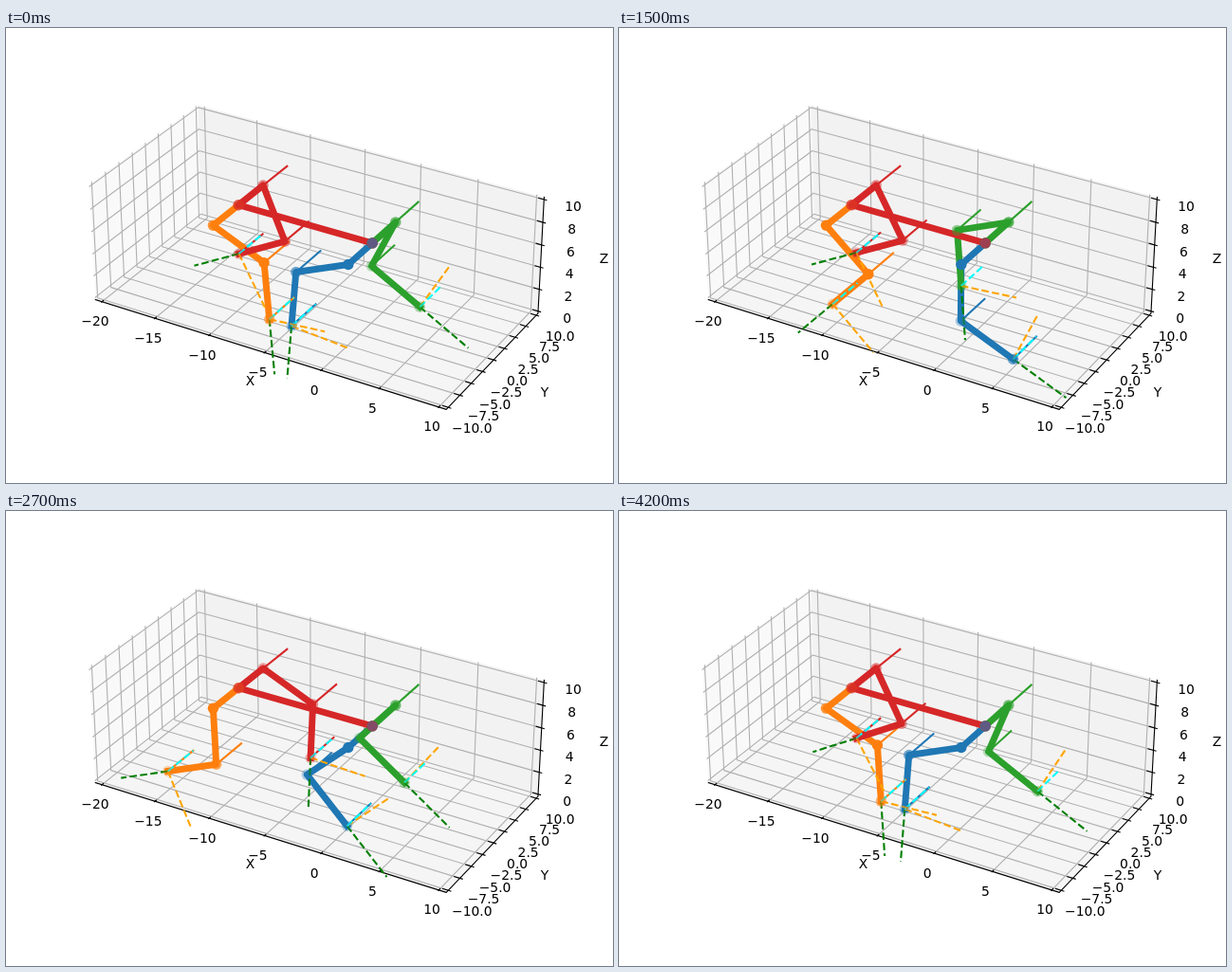
An HTML page with a canvas for the animation above (4300 ms loop, 640x480 px).

```html
<!DOCTYPE html>
<html>
<head>
<meta charset="utf-8">
<style>
  html, body { margin: 0; width: 100%; height: 100%; overflow: hidden; background: #fff; }
  canvas { display: block; }
</style>
</head>
<body>
<canvas id="stage" width="640" height="480"></canvas>
<script>
const ctx = document.getElementById('stage').getContext('2d');

const STEPS = 43, STEP_MS = 100;
const SWING = STEPS / 4, STANCE = STEPS - SWING;
const STRIDE = 5, LIFT = 0.25, LINK = 5, AXIS = 5, HEIGHT = 7;
const THIN = 2.08, THICK = 6.94, HAIR = 1.11;

// Visible box, slightly larger than the axis limits
const X0 = -20.625, X1 = 10.625, Y0 = -10.417, Y1 = 10.417, Z0 = -0.208, Z1 = 10.208;

// bend: which side the knee folds to; delay: gait offset in steps
const blue   = { color: '#1f77b4', x: 0,   y: -5, bend: 1,  delay: 0,  footAxis: true };
const orange = { color: '#ff7f0e', x: -12, y: -5, bend: -1, delay: 32, footAxis: true };
const green  = { color: '#2ca02c', x: 0,   y: 5,  bend: 1,  delay: 21, footAxis: false };
const red    = { color: '#d62728', x: -12, y: 5,  bend: -1, delay: 11, footAxis: true, spine: true };
const lineOrder = [blue, orange, green, red];
const markerOrder = [orange, green, red, blue];

// Perspective camera: elevation 30, azimuth -60, distance 10
function project([x, y, z]) {
  const a = (x + 5) * 0.05227, b = y * 0.0392, c = (z - 5) * 0.05227;
  const near = 0.433 * a - 0.75 * b + 0.5 * c;
  const k = 2594.6 / (10 - near);
  return {
    x: 326.5 + k * (0.866 * a + 0.5 * b),
    y: 233.5 - k * (-0.25 * a + 0.433 * b + 0.866 * c),
    near
  };
}

function trace(points) {
  ctx.beginPath();
  points.map(project).forEach(p => ctx.lineTo(p.x, p.y));
}

function line(points, color, width, { cap = 'square', dash = [] } = {}) {
  trace(points);
  ctx.strokeStyle = color;
  ctx.lineWidth = width;
  ctx.lineCap = cap;
  ctx.lineJoin = 'round';
  ctx.setLineDash(dash);
  ctx.stroke();
}

function pane(points, color) {
  trace(points);
  ctx.fillStyle = color;
  ctx.fill();
}

function label(text, x, y) {
  ctx.fillStyle = '#000';
  ctx.fillText(text, x, y + 5);
}

function range(from, to, step) {
  const values = [];
  for (let v = from; v <= to; v += step) values.push(v);
  return values;
}

function tick(text, at, inner, outer, dx, dy) {
  line([inner, outer], '#000', HAIR, { cap: 'butt' });
  const p = project(at);
  label(text.replace('-', '\u2212'), p.x + dx, p.y + dy);
}

function drawAxes() {
  ctx.font = '13.89px "DejaVu Sans", sans-serif';
  ctx.textAlign = 'center';
  pane([[X0, Y0, Z0], [X0, Y1, Z0], [X0, Y1, Z1], [X0, Y0, Z1]], '#f9f9f9');
  pane([[X0, Y1, Z0], [X1, Y1, Z0], [X1, Y1, Z1], [X0, Y1, Z1]], '#f2f2f2');
  pane([[X0, Y0, Z0], [X1, Y0, Z0], [X1, Y1, Z0], [X0, Y1, Z0]], '#f5f5f5');

  const xs = range(-20, 10, 5), ys = range(-10, 10, 2.5), zs = range(0, 10, 2);
  const grid = points => line(points, '#b0b0b0', HAIR);
  xs.forEach(x => grid([[x, Y0, Z0], [x, Y1, Z0], [x, Y1, Z1]]));
  ys.forEach(y => grid([[X1, y, Z0], [X0, y, Z0], [X0, y, Z1]]));
  zs.forEach(z => grid([[X0, Y0, z], [X0, Y1, z], [X1, Y1, z]]));

  line([[X0, Y0, Z0], [X1, Y0, Z0], [X1, Y1, Z0], [X1, Y1, Z1]], '#000', HAIR);
  xs.forEach(x => tick(String(x), [x, Y0, Z0], [x, Y0 + 0.33, Z0], [x, Y0 - 0.17, Z0], -7.2, 20.5));
  ys.forEach(y => tick(y.toFixed(1), [X1, y, Z0], [X1 - 0.5, y, Z0], [X1 + 0.25, y, Z0], 25, 21.8));
  zs.forEach(z => tick(String(z), [X1, Y1, z], [X1 - 0.5, Y1, z], [X1 + 0.25, Y1, z], 30.7, 7));

  label('X', 257.5, 372);
  label('Y', 568, 384);
  label('Z', 630.5, 242.5);
}

// Foot position relative to the hip's ground point
function footOffset(step) {
  const p = (step + STEPS) % STEPS;
  if (p < SWING) {
    const a = Math.PI * p / SWING;
    return [-STRIDE * Math.cos(a), LIFT * Math.sin(a)];
  }
  return [STRIDE * Math.cos(Math.PI * (p - SWING) / STANCE), 0];
}

function poseLeg(leg, step) {
  const [fx, fz] = footOffset(step - leg.delay);
  const dz = fz - HEIGHT;
  const reach = Math.hypot(fx, dz);
  const fold = leg.bend * Math.sqrt(LINK * LINK - reach * reach / 4) / reach;
  const hip = [leg.x, leg.y, HEIGHT];
  const knee = [leg.x + fx / 2 + dz * fold, leg.y, HEIGHT + dz / 2 - fx * fold];
  const foot = [leg.x + fx, leg.y, fz];
  const joints = [[leg.x, 0, HEIGHT], hip, knee, foot];
  if (leg.spine) joints.unshift([0, 0, HEIGHT]);
  return { hip, knee, foot, joints };
}

function drawLeg(leg, { hip, knee, foot, joints }) {
  const ray = ([x, y, z], dx, dy, dz, color, style) =>
    line([[x, y, z], [x + dx, y + dy, z + dz]], color, THIN, style);
  const dashed = { cap: 'butt', dash: [7.7, 3.33] };

  line(joints, leg.color, THICK);
  const hinges = leg.footAxis ? [hip, knee, foot] : [hip, knee];
  hinges.forEach(joint => ray(joint, 0, AXIS, 0, leg.color));

  const ux = (foot[0] - knee[0]) / LINK * AXIS, uz = (foot[2] - knee[2]) / LINK * AXIS;
  ray(foot, ux, 0, uz, 'green', dashed);
  ray(foot, -uz, 0, ux, 'orange', dashed);
  ray(foot, 0, AXIS, 0, 'cyan', dashed);
}

// Nearer joints are more opaque
function drawMarkers(leg, { joints }) {
  const dots = joints.map(project).sort((a, b) => a.near - b.near);
  const far = dots[0].near, near = dots[dots.length - 1].near;
  ctx.fillStyle = leg.color;
  for (const dot of dots) {
    ctx.globalAlpha = 0.3 + 0.7 * (dot.near - far) / (near - far);
    ctx.beginPath();
    ctx.arc(dot.x, dot.y, 5.7, 0, 2 * Math.PI);
    ctx.fill();
  }
  ctx.globalAlpha = 1;
}

function draw(step) {
  ctx.fillStyle = '#fff';
  ctx.fillRect(0, 0, 640, 480);
  drawAxes();
  const poses = new Map(lineOrder.map(leg => [leg, poseLeg(leg, step)]));
  lineOrder.forEach(leg => drawLeg(leg, poses.get(leg)));
  markerOrder.forEach(leg => drawMarkers(leg, poses.get(leg)));
}

const start = performance.now();
function tickFrame() {
  draw(Math.floor((performance.now() - start) / STEP_MS) % STEPS);
  requestAnimationFrame(tickFrame);
}
tickFrame();
</script>
</body>
</html>
```
